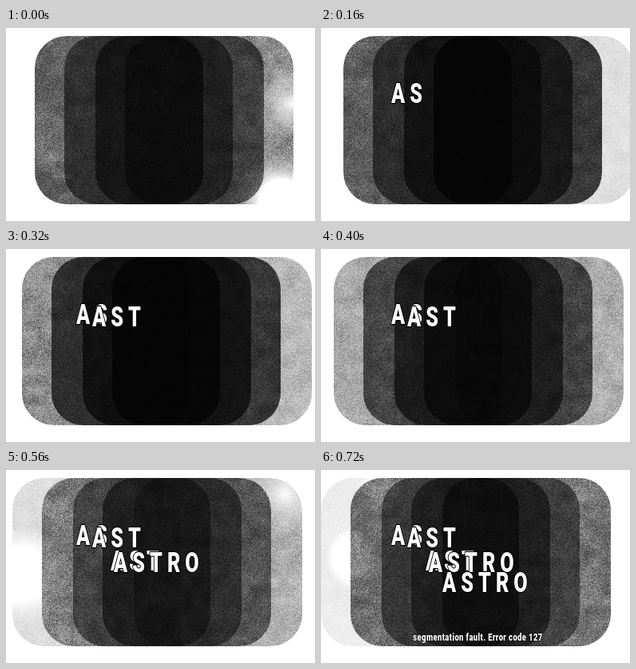
Recreate the animation shown at these times as an HTML page with a canvas. Size 387 by 242 pixels, loop 800 ms.

```html
<!DOCTYPE html>
<html lang="en">
<head>
<meta charset="utf-8">
<title>Astro</title>
<style>
  html, body { margin: 0; width: 100%; height: 100%; overflow: hidden; background: #fff; }
  canvas, svg { position: absolute; left: 0; top: 0; width: 387px; height: 242px; }
  text {
    font-family: Roboto, "Open Sans", sans-serif;
    font-weight: 900;
    fill: #fff;
    stroke: #000;
    stroke-width: 2px;
    stroke-linejoin: round;
    paint-order: stroke;
    vector-effect: non-scaling-stroke;
  }
  .word { font-size: 36px; letter-spacing: 8.6px; }
  .note { font-size: 13.5px; letter-spacing: .57px; stroke-width: 1px; }
</style>
</head>
<body>
<canvas id="stage" width="387" height="242"></canvas>
<svg id="words" viewBox="0 0 387 242"></svg>
<script>
const W = 387, H = 242, STEP = 80, STEPS = 10;
const ctx = document.getElementById('stage').getContext('2d');
const svg = document.getElementById('words');

// Cards slide left 4px per step; tones are percent grey, left card first.
const offsets = [0, 37, 76, 113, 152];
const tones = [
  [37, 48, 45, 55, 100],
  [37, 46, 42, 38, 94],
  [36, 45, 40, 25, 88],
  [42, 26, 30, 20, 76],
  [55, 32, 33, 28, 72],
  [66, 40, 40, 38, 68],
  [80, 50, 50, 46, 70],
  [87, 55, 52, 46, 69],
  [93, 58, 55, 50, 66],
  [93, 45, 50, 52, 45]
];

// Soft lights per step: x, y, radius, strength.
const lights = {
  0: [[345, 218, 60, .85], [358, 95, 50, .45], [55, 150, 60, .2]],
  1: [[335, 200, 60, .4]],
  6: [[15, 130, 50, .25]],
  7: [[20, 130, 60, .3], [350, 30, 50, .3]],
  8: [[355, 15, 60, .45], [345, 205, 60, .35], [60, 30, 50, .2]],
  9: [[45, 110, 40, .3], [90, 30, 45, .2]]
};

const lines = [
  { text: 'AS', x: 88, y: 94, from: 2 },
  { text: 'AST', x: 108, y: 97, from: 4 },
  { text: 'AST', x: 131, y: 126, from: 6 },
  { text: 'ASTRO', x: 135, y: 127.5, from: 7 },
  { text: 'ASTRO', x: 152, y: 152.5, from: 8 },
  { text: 'segmentation fault. Error code 127', x: 196.5, y: 214, from: 9, note: true }
];

for (const line of lines) {
  const el = document.createElementNS('http://www.w3.org/2000/svg', 'text');
  el.textContent = line.text;
  el.setAttribute('class', line.note ? 'note' : 'word');
  el.setAttribute('transform', `translate(${line.x} ${line.y}) scale(.7 1)`);
  if (line.note) el.setAttribute('text-anchor', 'middle');
  svg.append(el);
  line.el = el;
}

function random(seed) {
  return () => {
    seed = (seed * 1664525 + 1013904223) >>> 0;
    return seed / 4294967296;
  };
}

function noise(w, h, spread, seed) {
  const c = document.createElement('canvas');
  c.width = w;
  c.height = h;
  const g = c.getContext('2d'), img = g.createImageData(w, h), rnd = random(seed);
  for (let i = 0; i < img.data.length; i += 4) {
    const v = 128 + (rnd() + rnd() - 1) * spread;
    img.data.fill(v, i, i + 3);
    img.data[i + 3] = 255;
  }
  g.putImageData(img, 0, 0);
  return c;
}

const grain = noise(W + 80, H + 80, 62, 7);
const clouds = noise(40, 26, 70, 21);

function drawCard(x, tone) {
  const v = Math.round(tone * 2.55);
  ctx.fillStyle = `rgb(${v},${v},${v})`;
  ctx.beginPath();
  ctx.roundRect(x, 10, 211, 211, 40);
  ctx.fill();
}

function drawLight([x, y, r, k]) {
  const v = Math.round(k * 255);
  const glow = ctx.createRadialGradient(x, y, 0, x, y, r);
  glow.addColorStop(0, `rgb(${v},${v},${v})`);
  glow.addColorStop(1, '#000');
  ctx.fillStyle = glow;
  ctx.fillRect(x - r, y - r, 2 * r, 2 * r);
}

function draw(step) {
  ctx.globalCompositeOperation = 'source-over';
  ctx.fillStyle = '#fff';
  ctx.fillRect(0, 0, W, H);

  ctx.globalCompositeOperation = 'multiply';
  offsets.forEach((dx, i) => drawCard(36 - 4 * step + dx, tones[step][i]));

  ctx.globalCompositeOperation = 'color-dodge';
  (lights[step] || []).forEach(drawLight);

  // Overlay keeps pure black and white clean.
  ctx.globalCompositeOperation = 'overlay';
  ctx.globalAlpha = .5;
  ctx.drawImage(clouds, -(step * 29 % 80), -(step * 17 % 60), 480, 312);
  ctx.globalAlpha = 1;
  ctx.drawImage(grain, -(step * 37 % 80), -(step * 53 % 80));

  for (const line of lines) line.el.style.display = step >= line.from ? '' : 'none';
}

const start = performance.now();
let shown = -1;
function tick() {
  const step = Math.floor((performance.now() - start) / STEP) % STEPS;
  if (step !== shown) draw(shown = step);
  requestAnimationFrame(tick);
}
tick();
</script>
</body>
</html>
```
